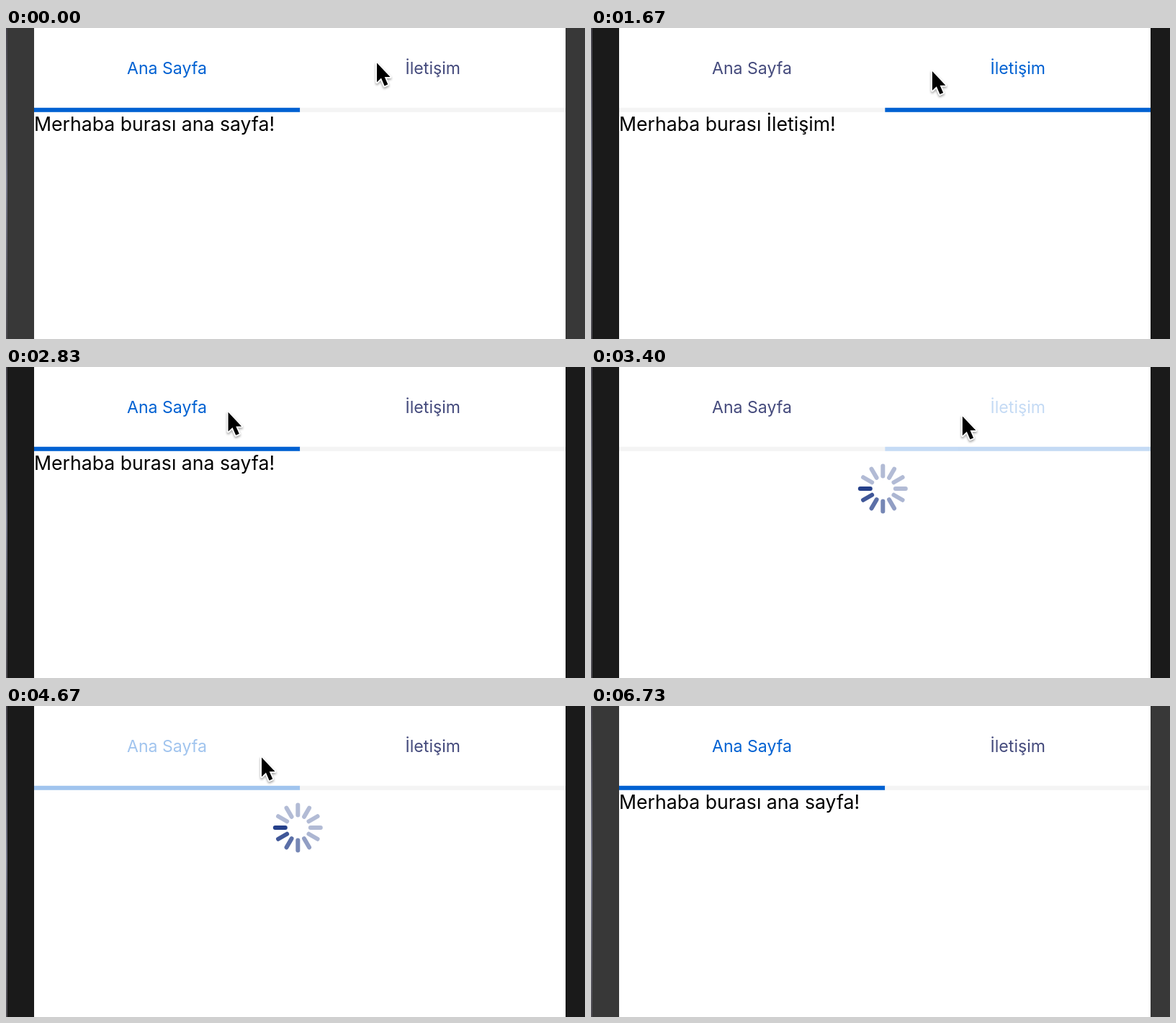
These frames come from a looping animation (804 by 432 pixels, 6.76 s). An HTML page:

```html
<!DOCTYPE html>
<html lang="tr">
<head>
<meta charset="utf-8">
<title>Sekmeler</title>
<style>
  html, body { margin: 0; width: 100%; height: 100%; overflow: hidden; background: #fff; }
  svg { display: block; width: 804px; height: 432px; }
  text { font-family: Inter, "Open Sans", sans-serif; }
  .label { font-size: 23.1px; text-anchor: middle; }
  .body { font-size: 26.65px; }
  .spoke { stroke: #25408a; stroke-width: 6; stroke-linecap: round; }
  #cursor { filter: drop-shadow(0 2px 1.5px rgba(0, 0, 0, .35)); }
</style>
</head>
<body>
<svg viewBox="0 0 804 432">
  <defs>
    <linearGradient id="edge" x2="0" y2="1">
      <stop offset="0" stop-color="#44424a"/>
      <stop offset=".5" stop-color="#747688"/>
      <stop offset="1" stop-color="#4c4a50"/>
    </linearGradient>
  </defs>
  <rect width="804" height="432" fill="#fff"/>
  <g id="frame"><rect x="1" width="38" height="432"/><rect x="777" width="27" height="432"/></g>
  <rect width="2" height="432" fill="url(#edge)"/>
  <g class="tab">
    <text class="label" x="223.5" y="63.5">Ana Sayfa</text>
    <rect x="39" y="110.8" width="369.3" height="6"/>
  </g>
  <g class="tab">
    <text class="label" x="592.8" y="63.5">İletişim</text>
    <rect x="408.3" y="110.8" width="368.7" height="6"/>
  </g>
  <text class="body" id="content" x="39" y="143"></text>
  <g id="spinner" transform="translate(405.3 169)"></g>
  <g id="cursor">
    <path d="M0 0V26L5.8 20.5L10.3 31L14.8 29L10.4 19H18Z" fill="#000"
      stroke="#fff" stroke-width="3.6" stroke-linejoin="round" paint-order="stroke"/>
  </g>
</svg>
<script>
const LOOP = 6760, FADE_IN = 60, FADE_OUT = 250, LOADING = 128;
const ACTIVE = '#0061d2', INACTIVE = '#444a7c', TRACK = '#f4f4f4';
const MESSAGES = ['Merhaba burası ana sayfa!', 'Merhaba burası İletişim!'];

const taps = [
  { tab: 1, down: 770, up: 922 },
  { tab: 0, down: 2140, up: 2262 },
  { tab: 1, down: 3250, up: 3368 },
  { tab: 0, down: 4360, up: 4590 },
];
const focused = { from: 770, to: 6150 };

// The pointer rests between moves; each one glides to a new spot.
const origin = { x: 515, y: 48.5 };
const moves = [
  { from: 0, to: 700, x: 587, y: 58.5, lift: 30 },
  { from: 1300, to: 2140, x: 297, y: 62.5, lift: 0 },
  { from: 2750, to: 3250, x: 517, y: 68.5, lift: 0 },
  { from: 3380, to: 3730, x: 355, y: 71.5, lift: 0 },
  { from: 4850, to: 5450, x: 430, y: -50, lift: 0 },
];

const $ = id => document.getElementById(id);
const frame = $('frame'), content = $('content'), spinner = $('spinner'), cursor = $('cursor');
const tabs = [...document.querySelectorAll('.tab')];
const clamp = v => Math.min(1, Math.max(0, v));
const ease = u => u < .5 ? 2 * u * u : 1 - 2 * (1 - u) ** 2;
const progress = (t, from, to) => ease(clamp((t - from) / (to - from)));

const spokes = Array.from({ length: 12 }, (_, i) => {
  const line = document.createElementNS('http://www.w3.org/2000/svg', 'line');
  line.setAttribute('class', 'spoke');
  line.setAttribute('y1', -17.5);
  line.setAttribute('y2', -31.5);
  line.setAttribute('transform', `rotate(${i * 30})`);
  return spinner.appendChild(line);
});

function tabOpacity(tab, t) {
  const tap = taps.filter(p => p.tab === tab && p.down <= t).pop();
  if (!tap) return 1;
  return t < tap.up
    ? 1 - .8 * progress(t, tap.down, tap.down + FADE_IN)
    : .2 + .8 * progress(t, tap.up, tap.up + FADE_OUT);
}

function pointerAt(t) {
  let { x, y } = origin;
  for (const move of moves) {
    const u = progress(t, move.from, move.to);
    x += (move.x - x) * u;
    y += (move.y - y) * u - move.lift * Math.sin(Math.PI * u);
  }
  return [x, y];
}

function render(t) {
  const last = taps.filter(p => p.up <= t).pop();
  const current = last ? last.tab : 0;
  const sinceTap = last ? t - last.up : Infinity;
  const loading = sinceTap < LOADING;

  tabs.forEach((tab, i) => {
    const [label, bar] = tab.children;
    label.setAttribute('fill', i === current ? ACTIVE : INACTIVE);
    bar.setAttribute('fill', i === current ? ACTIVE : TRACK);
    tab.setAttribute('opacity', tabOpacity(i, t));
  });

  content.textContent = loading ? '' : MESSAGES[current];
  spinner.style.display = loading ? '' : 'none';
  if (loading) {
    const head = 9 + Math.floor(sinceTap / (1000 / 12));
    spokes.forEach((spoke, i) => {
      const age = (head - i + 12) % 12;
      spoke.setAttribute('opacity', Math.max(.35, 1 - .125 * age));
    });
  }

  frame.setAttribute('fill', t >= focused.from && t < focused.to ? '#1a1a1a' : '#383838');
  cursor.setAttribute('transform', `translate(${pointerAt(t)}) scale(1.03)`);
}

const start = performance.now();
function tick() {
  render((performance.now() - start) % LOOP);
  requestAnimationFrame(tick);
}
tick();
</script>
</body>
</html>
```
